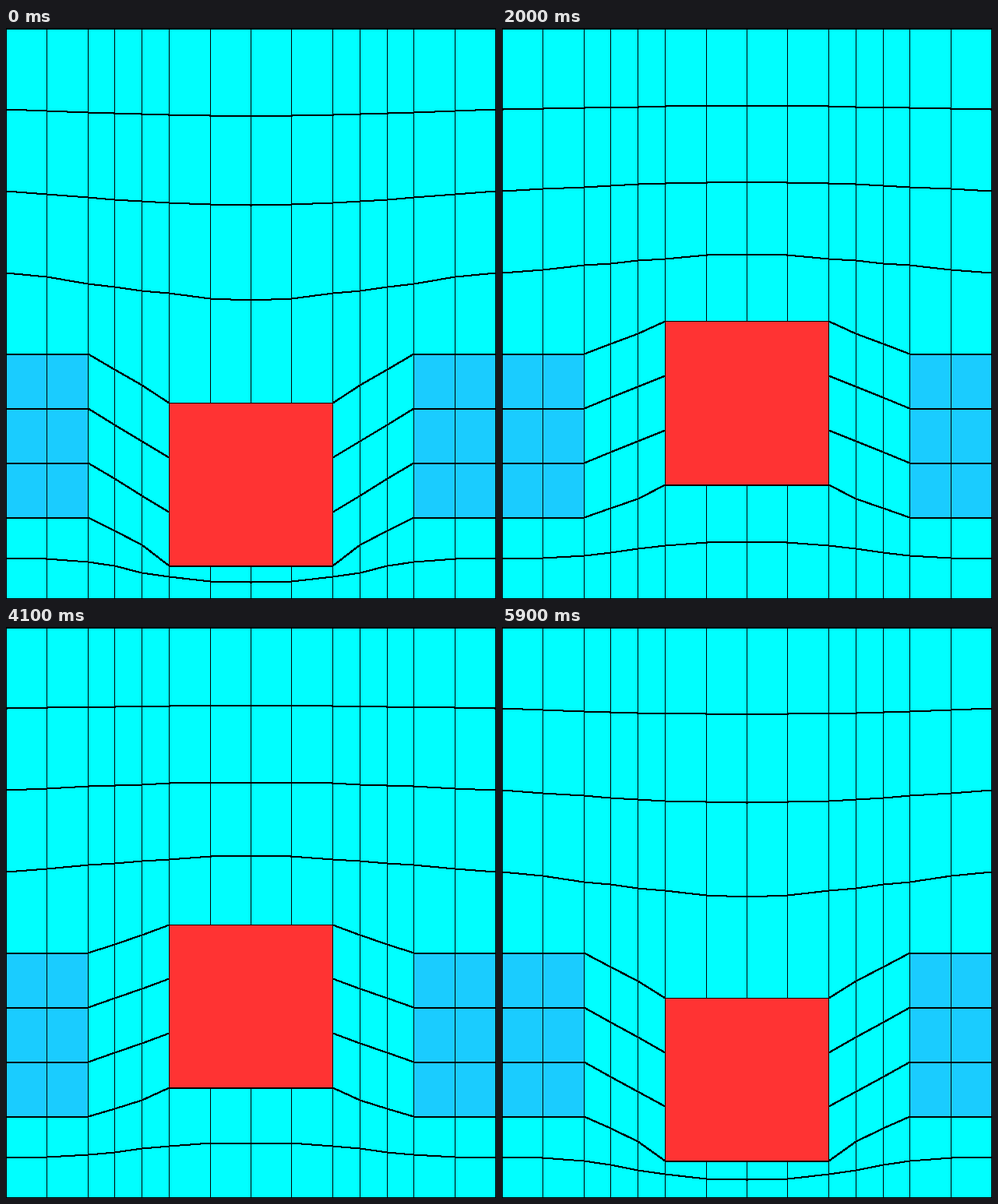
Animation, 629 px wide and 733 px high, one loop 6000 ms. Source, as a matplotlib script:

```python
import numpy as np
import matplotlib.pyplot as plt
from matplotlib.animation import FuncAnimation
from matplotlib.patches import Rectangle

W, H, DPI = 629, 733, 64
FRAMES, INTERVAL = 60, 100
UNIT = (W - 1) / 12
PIXEL = 72 / DPI
CYAN, BLUE, RED = "#00ffff", "#1accff", "#ff3333"

plt.rcParams["path.simplify"] = False

# Mesh lines in units; columns mirror about the centre
half = np.array([0, 1, 2, 2.66, 3.33, 4, 5])
cols = np.concatenate([half, [6], 12 - half[::-1]])
rows = np.array([0, 2, 4, 6, 8, 28 / 3, 32 / 3, 12, 13, 14])
NX, NY = len(cols), len(rows)
TOP, BOTTOM = 4, 7          # rows spanned by the solid blocks
LEFT, RIGHT = 5, 9          # columns spanned by the moving block


def stiffness(hx, hy):
    """Laplace matrix of a bilinear rectangle, nodes in cyclic order."""
    r, s = hy / hx, hx / hy
    across, along, diag = (s - 2 * r) / 6, (r - 2 * s) / 6, -(r + s) / 6
    own = (r + s) / 3
    return np.array([[own, across, diag, along],
                     [across, own, along, diag],
                     [diag, along, own, across],
                     [along, diag, across, own]])


def unit_shift():
    """Mesh displacement when the moving block shifts by one."""
    k = np.zeros((NX * NY, NX * NY))
    for j in range(NY - 1):
        for i in range(NX - 1):
            a, b = j * NX + i, (j + 1) * NX + i
            nodes = [a, a + 1, b + 1, b]
            k[np.ix_(nodes, nodes)] += stiffness(cols[i + 1] - cols[i],
                                                 rows[j + 1] - rows[j])
    fixed = np.zeros((NY, NX), bool)
    fixed[[0, -1], :] = True
    fixed[:, [0, -1]] = True
    value = np.zeros((NY, NX))
    blocks = slice(TOP, BOTTOM + 1)
    fixed[blocks, :3] = fixed[blocks, -3:] = True
    fixed[blocks, LEFT:RIGHT + 1] = True
    value[blocks, LEFT:RIGHT + 1] = 1

    held, u = fixed.ravel(), value.ravel()
    free = ~held
    u[free] = np.linalg.solve(k[np.ix_(free, free)],
                              -k[np.ix_(free, held)] @ u[held])
    return u.reshape(NY, NX)


def snap(v):
    return np.floor(v + 0.5)


def block_offset(n):
    """Steady travel up for half the loop, then back down."""
    return 1.2 - 0.1 * min(n, FRAMES - n)


shift = unit_shift()
px = snap(cols * UNIT)
y_start = (H - 1 - rows[-1] * UNIT) / 2


def mesh_y(n):
    return snap(y_start + UNIT * (rows[:, None] + block_offset(n) * shift))


fig = plt.figure(figsize=(W / DPI, H / DPI), dpi=DPI, facecolor=CYAN)
ax = fig.add_axes([0, 0, 1, 1])
ax.set_xlim(0, W)
ax.set_ylim(H, 0)
ax.axis("off")

STROKE = dict(lw=PIXEL, antialiased=False, snap=False)
y0 = mesh_y(0)

for first in (0, NX - 3):
    x, y = px[first], y0[TOP, 0]
    ax.add_patch(Rectangle((x + 0.5, y + 0.5), px[first + 2] - x,
                           y0[BOTTOM, 0] - y, fc=BLUE, ec="black",
                           zorder=1, **STROKE))

for x in px:
    ax.plot([x + 0.5] * 2, [0.5, H - 0.5], color="black", zorder=2, **STROKE)

# The small extra offset settles ties between two pixels
row_lines = [ax.plot(px + 0.5, y + 0.52, color="black", zorder=2, **STROKE)[0]
             for y in y0]

block = ax.add_patch(Rectangle((px[LEFT] + 0.5, 0), px[RIGHT] - px[LEFT], 1,
                               fc=RED, ec="black", zorder=3, **STROKE))


def draw(n):
    y = mesh_y(n)
    for line, level in zip(row_lines, y):
        line.set_ydata(level + 0.52)
    block.set_y(y[TOP, LEFT] + 0.5)
    block.set_height(y[BOTTOM, LEFT] - y[TOP, LEFT])
    return [*row_lines, block]


anim = FuncAnimation(fig, draw, frames=FRAMES, interval=INTERVAL,
                     repeat=True, repeat_delay=0)
plt.show()
```
